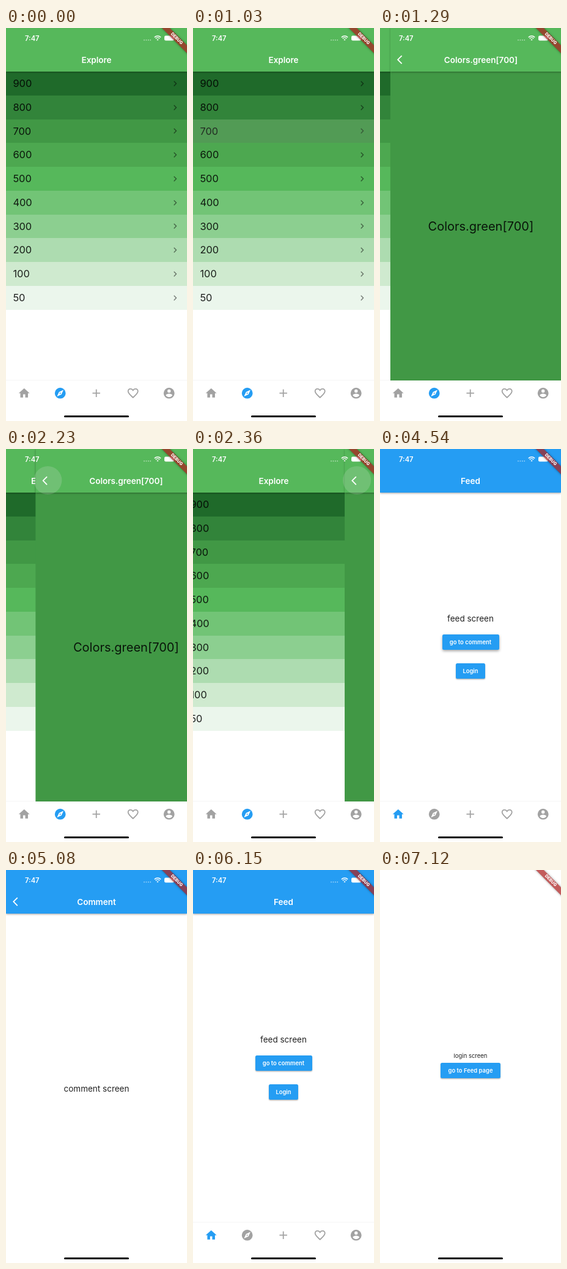
Recreate the animation shown at these times as an HTML page. Size 296x640 px, loop 8000 ms.

```html
<!DOCTYPE html>
<html lang="en">
<head>
<meta charset="utf-8">
<title>Tab navigation</title>
<style>
  * { box-sizing: border-box; }
  html, body { margin: 0; width: 100%; height: 100%; overflow: hidden; background: #fff; }
  body { font-family: Inter, "Liberation Sans", sans-serif; color: rgba(0, 0, 0, .87); }
  #stage { position: relative; width: 296px; height: 640px; overflow: hidden; --blue: #259df3; --green: #56b85b; }
  #stage div, #stage svg, .label { position: absolute; }
  .page { inset: 0; background: #fff; }
  #tabs { left: 0; top: 0; width: 296px; height: 574px; overflow: hidden; }

  .header { left: 0; top: 0; width: 296px; height: 71.2px; color: #fff; background: var(--blue);
    box-shadow: 0 1px 3px rgba(0, 0, 0, .38); }
  .green { background: var(--green); }
  .label { left: 0; width: 296px; text-align: center; line-height: 24px; white-space: pre; }
  .title { top: 39.5px; font-size: 13.5px; font-weight: 600; }
  .back { left: 11.4px; top: 42.8px; width: 17.2px; height: 17.2px; fill: #fff; }
  #touch { left: -3px; top: 28px; width: 46px; height: 46px; border-radius: 50%; background: rgba(215, 225, 215, .2); }

  .row { left: 0; width: 296px; height: 38.75px; padding-left: 11.4px; font-size: 16.4px; line-height: 38.75px; }
  .row svg { left: 267.6px; top: 10.8px; width: 17.2px; height: 17.2px; fill: rgba(0, 0, 0, .5); }
  .row.held::after { content: ""; position: absolute; inset: 0; background: rgba(170, 170, 170, .16); }
  #detail { background: #419845; }

  .big { font-size: 13.5px; }
  .button { height: 25px; border-radius: 2.5px; background: var(--blue); color: #fff; text-align: center;
    font-size: 9.45px; font-weight: 600; line-height: 25px; white-space: pre;
    box-shadow: 0 1.3px 2px rgba(0, 0, 0, .32); }
  .button.held { box-shadow: 0 2px 4px rgba(0, 0, 0, .36); }

  #bar { left: 0; top: 574px; width: 296px; height: 66px; background: #fff; box-shadow: 0 -1px 0 rgba(0, 0, 0, .04); }
  #bar svg { top: 9.8px; width: 21.4px; height: 21.4px; color: #a2a2a2; fill: currentColor; }
  #bar svg.on { color: var(--blue); }
  #ripple { left: 5.5px; top: -2px; width: 48px; height: 48px; border-radius: 50%; background: rgba(0, 0, 0, .045); }

  #clock { left: 31px; top: 5px; color: #fff; font-size: 11.2px; font-weight: 600; line-height: 24px; }
  #status { left: 222px; top: 8px; width: 60px; height: 18px; fill: #fff; }
  #banner { left: 239px; top: 12.6px; width: 80px; height: 8.6px; transform: rotate(45deg);
    background: rgba(172, 30, 30, .72); box-shadow: 0 0 4px rgba(0, 0, 0, .4);
    color: #fff; font-size: 7px; font-weight: 800; line-height: 8.8px; text-align: center; }
  #grip { left: 95px; top: 630.8px; width: 106px; height: 3.5px; border-radius: 2px; background: #000; }
</style>
</head>
<body>
<div id="stage">
  <div id="shell" class="page">
    <div id="tabs">
      <div id="explore" class="page">
        <div id="list"></div>
        <div class="header green"><span class="label title">Explore</span></div>
      </div>
      <div id="detail" class="page">
        <span class="label" style="top:311px;font-size:20px">Colors.green[700]</span>
        <div class="header green">
          <div id="touch"></div>
          <svg class="back" viewBox="0 0 24 24"><path d="M11.7 3.9 9.9 2.1 0 12l9.9 9.9 1.8-1.8L3.5 12z"/></svg>
          <span class="label title">Colors.green[700]</span>
        </div>
      </div>
      <div id="feed" class="page">
        <span class="label big" style="top:264px">feed screen</span>
        <div id="toComment" class="button" style="left:101.5px;top:302px;width:93px">go to comment</div>
        <div id="toLogin" class="button" style="left:124px;top:349px;width:48px">Login</div>
        <div class="header"><span class="label title">Feed</span></div>
      </div>
    </div>
    <div id="bar"><div id="ripple"></div></div>
  </div>

  <div id="comment" class="page">
    <span class="label big" style="top:344px">comment screen</span>
    <div class="header">
      <svg class="back" viewBox="0 0 24 24"><path d="M11.7 3.9 9.9 2.1 0 12l9.9 9.9 1.8-1.8L3.5 12z"/></svg>
      <span class="label title">Comment</span>
    </div>
  </div>

  <div id="login" class="page">
    <span class="label" style="top:291px;font-size:9.5px">login screen</span>
    <div class="button" style="left:99px;top:313.5px;width:98px">go to Feed page</div>
  </div>

  <div id="clock">7:47</div>
  <svg id="status" viewBox="0 0 60 18">
    <g opacity=".6"><circle cx="4" cy="11.6" r=".9"/><circle cx="7.4" cy="11.6" r=".9"/><circle cx="10.8" cy="11.6" r=".9"/><circle cx="14.2" cy="11.6" r=".9"/></g>
    <g transform="translate(20 4)">
      <path d="M.8 3.2a7.4 7.4 0 0 1 10.4 0M2.7 5.2a4.7 4.7 0 0 1 6.6 0" fill="none" stroke="#fff" stroke-width="1.5"/>
      <path d="M4.4 6.9a2.3 2.3 0 0 1 3.2 0L6 8.6z"/>
    </g>
    <rect x="37" y="4.5" width="16" height="8" rx="2.2"/>
    <rect x="53.6" y="7" width="1" height="3" rx=".5" opacity=".6"/>
  </svg>
  <div id="banner">DEBUG</div>
  <div id="grip"></div>
</div>

<script>
const $ = id => document.getElementById(id);
const WIDTH = 296, LOOP = 8000, SLIDE = 400;

const shades = [
  [900, '#1f6a2a'], [800, '#32843a'], [700, '#419845'], [600, '#4da850'], [500, '#56b85b'],
  [400, '#72c476'], [300, '#8ccf90'], [200, '#addcb0'], [100, '#cfeacf'], [50, '#ebf6ec']
];
$('list').innerHTML = shades.map(([name, color], i) =>
  `<div class="row" style="top:${71.2 + i * 38.75}px;background:${color}">${name}` +
  '<svg viewBox="0 0 24 24"><path d="M10 6 8.6 7.4 13.2 12l-4.6 4.6L10 18l6-6z"/></svg></div>').join('');
const tappedRow = $('list').children[2];

const icons = [
  '<path d="M10 20v-6h4v6h5v-8h3L12 3 2 12h3v8z"/>',
  '<path fill-rule="evenodd" d="M12 2a10 10 0 1 0 0 20 10 10 0 0 0 0-20zM6 18l3.8-8.2L18 6l-3.8 8.2z"/><circle cx="12" cy="12" r="1.1"/>',
  '<path d="M19 13h-6v6h-2v-6H5v-2h6V5h2v6h6z"/>',
  '<path fill="none" stroke="currentColor" stroke-width="2" d="M12 20C7 15.5 3 12.3 3 8.5 3 6 5 4 7.5 4c1.8 0 3.5 1 4.5 2.7C13 5 14.7 4 16.5 4 19 4 21 6 21 8.5c0 3.8-4 7-9 11.5z"/>',
  '<circle cx="12" cy="12" r="10"/><g fill="#fff"><circle cx="12" cy="8" r="3"/><path d="M12 19.2c-2.5 0-4.7-1.3-6-3.2 0-2 4-3.1 6-3.1s6 1.1 6 3.1c-1.3 1.9-3.5 3.2-6 3.2z"/></g>'
];
$('bar').insertAdjacentHTML('beforeend', icons.map((shape, i) =>
  `<svg viewBox="0 0 24 24" style="left:${(i + .5) * WIDTH / 5 - 10.7}px">${shape}</svg>`).join(''));
const tabIcons = $('bar').querySelectorAll('svg');

// The picture holds between these moments.
const ticks = [0, 1030, 1150, 1290, 1430, 1530, 2230, 2360, 2490, 2600, 2710, 3470, 3590, 3700,
  4540, 4640, 4750, 4860, 4970, 5080, 5800, 5920, 6040, 6150, 6630, 6750, 6870, 7000, 7120];

const bezier = (a, b, s) => 3 * (1 - s) * s * ((1 - s) * a + s * b) + s ** 3;

// cubic-bezier(.35, .91, .33, .97)
function ease(x) {
  if (x <= 0) return 0;
  if (x >= 1) return 1;
  let lo = 0, hi = 1;
  for (let i = 0; i < 24; i++) {
    const mid = (lo + hi) / 2;
    if (bezier(.35, .33, mid) < x) lo = mid; else hi = mid;
  }
  return bezier(.91, .97, lo);
}

const shown = (t, open, close = Infinity) => ease((t - open) / SLIDE) - ease((t - close) / SLIDE);
const within = (t, from, to) => t >= from && t < to;
const shift = (id, x) => { $(id).style.transform = `translateX(${x.toFixed(2)}px)`; };
const show = (id, on) => { $(id).style.visibility = on ? 'visible' : 'hidden'; };

// The incoming page slides in full; the one below moves a third as far.
function stack(below, above, p) {
  shift(below, -p * WIDTH / 3);
  shift(above, (1 - p) * WIDTH);
  show(above, p > 0);
}

function render(time) {
  const t = ticks.findLast(k => k <= time);
  const home = t >= 3590;

  stack('explore', 'detail', shown(t, 1068, 2205));
  const comment = shown(t, 4620, 5720), login = shown(t, 6670);
  stack('shell', 'comment', comment);
  stack('shell', 'login', login);
  shift('shell', -(comment + login) * WIDTH / 3);

  show('feed', home);
  tabIcons[0].classList.toggle('on', home);
  tabIcons[1].classList.toggle('on', !home);

  tappedRow.classList.toggle('held', within(t, 1030, 1290));
  $('toComment').classList.toggle('held', within(t, 4540, 4750));
  $('toLogin').classList.toggle('held', within(t, 6630, 6870));
  $('touch').style.opacity = within(t, 2230, 2600) ? 1 : 0;
  $('ripple').style.opacity = within(t, 3470, 3590) ? 1 : within(t, 3590, 3700) ? .5 : 0;
}

const start = performance.now();
function loop() {
  render((performance.now() - start) % LOOP);
  requestAnimationFrame(loop);
}
loop();
</script>
</body>
</html>
```
